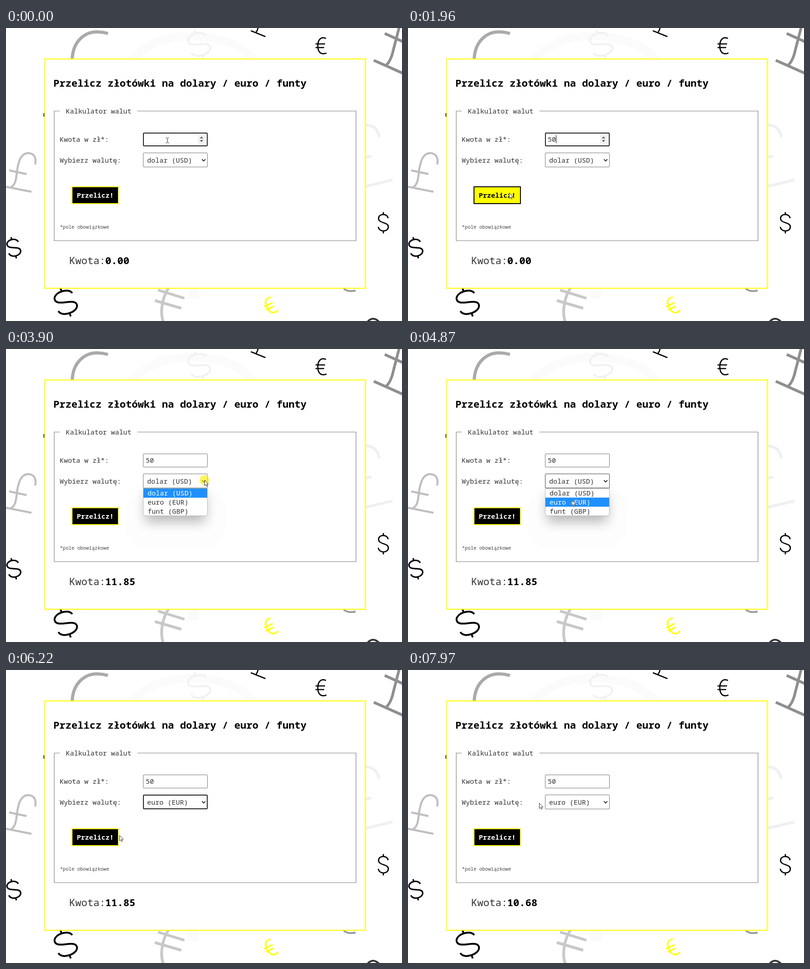
An HTML page for the animation above (8 s loop, 870 by 644 pixels).

```html
<!DOCTYPE html>
<html lang="pl">
<head>
<meta charset="utf-8">
<title>Kalkulator walut</title>
<style>
  html, body { margin: 0; width: 100%; height: 100%; overflow: hidden; background: #fff; }
  svg { display: block; width: 870px; height: 644px; }
  text { font: 300 15px "Noto Sans Mono", "DejaVu Sans Mono", monospace; fill: #333; white-space: pre; }
  .big { font-size: 22.08px; }
  .bold { font-weight: 700; fill: #000; }
  .semi { font-weight: 600; }
  .small { font-size: 10.6px; fill: #444; }
  .backdrop path { fill: none; vector-effect: non-scaling-stroke; }
</style>
</head>
<body>
<svg viewBox="0 0 870 644">
  <defs>
    <path id="dollar" vector-effect="non-scaling-stroke" d="M10.500-10C9-21-10.500-21-10.500-9.500C-10.500 2 11-2 11 9C11 21-10 21-11 9M0-23.500V-17M0 17V23.500"/>
    <path id="euro" vector-effect="non-scaling-stroke" d="M11-16C0-21-7-13-7 0C-7 14 0 21 12 16M-12-4H9M-12 4H7"/>
    <filter id="blur" x="-60%" y="-80%" width="220%" height="300%"><feGaussianBlur stdDeviation="13"/></filter>
  </defs>
  <rect width="870" height="644" fill="#fff"/>

  <g class="backdrop" fill="none" stroke="#000" stroke-width="2.700">
    <path stroke="#aaa" stroke-width="7" d="M145.500 68C147 30 172 8.500 200 8.500Q212 8.500 224 12"/>
    <path stroke="#fbfbfb" stroke-width="18" d="M274 70Q325 18 405 18Q500 18 545 70"/>
    <use href="#dollar" stroke="#f1f1f1" stroke-width="4" transform="translate(424 36) rotate(-18) scale(1.950 1.380)"/>
    <path d="M538 6L570 19M554-2Q553 5 549 10"/>
    <use href="#euro" transform="translate(692 39)"/>
    <path stroke="#8f8f8f" stroke-width="6" d="M808 71L872 99.500M864-2L851 48Q846 72 835 82M832 12L872 30"/>
    <path stroke="#f0f0f0" stroke-width="6" d="M790 213Q816 214 820 240M790 284L803 281M790 348L849 334"/>
    <path stroke="#bfbfbf" stroke-width="4.500" d="M64 300C68 283 59 274 47 275C31 277 27 296 24 315C22 336 20 346 9 351M0 349L56 360M7 313L45 321"/>
    <use href="#dollar" stroke-width="3.200" transform="translate(17 483) rotate(-14) scale(1.200 1.020)"/>
    <use href="#dollar" transform="translate(829 428)"/>
    <use href="#dollar" stroke-width="4" transform="translate(131 603) rotate(-20) scale(1.950 1.400)"/>
    <path stroke="#c8c8c8" stroke-width="6" d="M358 570C344 590 337 624 346 648M334 576L392 594M327 599L385 616"/>
    <path stroke="#fafafa" stroke-width="24" d="M412 573V595"/>
    <use href="#euro" stroke="#ff0" stroke-width="3.200" transform="translate(580 611) rotate(-27)"/>
    <path stroke="#999" stroke-width="4" d="M742 573Q752 581 768 577"/>
    <path stroke="#333" stroke-width="4" d="M793 647Q806 631 821 647"/>
    <path stroke-width="3" d="M84 187V195"/>
  </g>

  <rect x="85" y="68" width="705" height="504" fill="#fff" stroke="#ff0" stroke-width="2"/>
  <text class="big bold" x="104" y="129">Przelicz złotówki na dolary / euro / funty</text>
  <path d="M118 182.500H106V467.500H769V182.500H288.500" fill="none" stroke="#808080" stroke-width="1.200"/>
  <text x="131.500" y="188">Kalkulator walut</text>
  <text x="118" y="249.500">Kwota w zł*:</text>
  <text x="118" y="295.500">Wybierz walutę:</text>
  <text class="small" x="118.500" y="441">*pole obowiązkowe</text>
  <text class="big" x="139" y="519">Kwota:</text>
  <text class="big bold" x="218" y="519" id="result"></text>

  <rect id="inputBox" rx="1.500" fill="#fff"/>
  <text x="307" y="249.500" id="amount"></text>
  <path id="caret" d="M0 235.500V253" stroke="#000"/>
  <g id="spinner">
    <rect x="422" y="236" width="15" height="18" fill="#efefef"/>
    <path d="M426 242.500L429.500 238.500L433 242.500ZM426 246.500L429.500 250.500L433 246.500Z" fill="#505050"/>
  </g>

  <rect id="selectBox" rx="1.500" fill="#fff"/>
  <text x="310" y="295.500" id="choice"></text>
  <path d="M430.500 288.500L434.200 292.300L438 288.500" fill="none" stroke="#000" stroke-width="1.600"/>

  <rect id="button" x="145" y="349" width="102" height="37" stroke-width="2"/>
  <text class="semi" x="155.500" y="373" id="buttonText">Przelicz!</text>

  <g id="menu">
    <rect x="264" y="307" width="218" height="129" rx="45" fill="#fdfdfd"/>
    <rect x="306" y="320" width="132" height="60" fill="#000" opacity=".27" filter="url(#blur)"/>
    <path d="M301.500 306.500H442.500V361Q442.500 366.500 437 366.500H307Q301.500 366.500 301.500 361Z" fill="#fff" stroke="#bbb"/>
    <rect id="highlight" x="302" width="140" height="20" fill="#1e90ff"/>
  </g>

  <circle id="press" r="10.800" fill="#ffeb00" opacity=".62"/>
  <path id="beam" d="M351 241.500H353.500L354.500 242.500L355.500 241.500H358M354.500 242.500V251.500M351 252.500H353.500L354.500 251.500L355.500 252.500H358" fill="none" stroke="#222"/>
  <path id="arrow" d="M.5 .5V12.500L3.300 10L5.200 14L7 13.200L5.200 9.200H8.700Z" fill="#fff" stroke="#333"/>
</svg>
<script>
const LOOP = 8000, STEP = 70;
const el = id => document.getElementById(id);
const during = (t, from, to) => t >= from && t < to;
const set = (id, attrs) => {
  for (const key in attrs) el(id).setAttribute(key, attrs[key]);
};
const show = (id, on) => set(id, { visibility: on ? 'visible' : 'hidden' });

const options = ['dolar (USD)', 'euro (EUR)', 'funt (GBP)'];
const optionTexts = options.map((label, i) => {
  const text = document.createElementNS('http://www.w3.org/2000/svg', 'text');
  text.setAttribute('x', 311);
  text.setAttribute('y', 322 + i * 19.8);
  text.textContent = label;
  el('menu').append(text);
  return text;
});

// Each pointer move is a polyline of [time, x, y]
const moves = [
  [[1210, 354, 247], [1420, 237, 311], [1630, 214, 345], [1960, 222, 362]],
  [[3020, 222, 362], [3090, 258, 338], [3360, 345, 304], [3700, 436, 288]],
  [[4380, 436, 288], [4590, 398, 312], [4870, 360, 332], [5010, 357, 341]],
  [[5870, 357, 341], [6220, 249, 363], [6430, 224, 360]],
  [[7820, 224, 360], [7890, 250, 363], [7970, 288, 292]]
];

// The pointer is sampled in steps while it moves and rests in between
function pointerAt(t) {
  const move = moves.filter(m => t >= m[0][0]).pop() || moves[0];
  const start = move[0][0], last = move[move.length - 1];
  if (t >= last[0]) return [last[1], last[2]];
  const time = start + Math.max(0, Math.floor((t - start) / STEP)) * STEP;
  const i = move.findIndex(p => p[0] > time);
  const a = move[i - 1], b = move[i];
  const k = (time - a[0]) / (b[0] - a[0]);
  return [a[1] + (b[1] - a[1]) * k, a[2] + (b[2] - a[2]) * k];
}

const inside = ([x, y], left, top, right, bottom) =>
  x >= left && x <= right && y >= top && y <= bottom;

// The border is drawn inside the field's outer edge
function drawField(id, top, height, focused, color) {
  const line = focused ? 1.7 : 1;
  set(id, {
    x: 301 + line / 2, y: top + line / 2, width: 142 - line, height: height - line,
    stroke: focused ? '#000' : color, 'stroke-width': line
  });
}

function render(t) {
  const pointer = pointerAt(t);
  const seen = pointerAt(t - STEP); // hover styles trail the pointer by one step
  const place = { transform: `translate(${pointer})` };

  el('amount').textContent = t < 70 ? '' : t < 550 ? '5' : '50';
  el('result').textContent = t < 2160 ? '0.00' : t < 6960 ? '11.85' : '10.68';
  el('choice').textContent = options[t < 5540 ? 0 : 1];

  const typing = t < 2090;
  drawField('inputBox', 230, 30, typing, '#767676');
  show('spinner', typing);
  show('caret', during(t, 70, 1080) || during(t, 1610, 2090));
  set('caret', { transform: `translate(${t < 550 ? 316.5 : 325.5})` });

  const open = during(t, 3900, 5540);
  const selectHover = inside(seen, 301, 274, 443, 306);
  const dark = during(t, 4100, 5540) || (selectHover && !open);
  drawField('selectBox', 274, 32, during(t, 5540, 6690), dark ? '#444' : '#767676');

  show('menu', open);
  const active = pointer[1] > 326 ? 1 : 0;
  show('highlight', open);
  set('highlight', { y: 306.8 + active * 19.8 });
  optionTexts.forEach((text, i) => { text.style.fill = i === active ? '#fff' : '#333'; });

  const hover = inside(seen, 144, 348, 248, 387);
  set('button', { fill: hover ? '#ff0' : '#000', stroke: hover ? '#000' : '#ff0' });
  el('buttonText').style.fill = hover ? '#000' : '#fff';

  show('press', during(t, 2090, 2160) || during(t, 3900, 4100) ||
    during(t, 5340, 5540) || during(t, 6690, 6960));
  set('press', place);
  show('beam', t < 1280);
  show('arrow', t >= 1280);
  set('arrow', place);
}

const began = performance.now();
function frame() {
  render((performance.now() - began) % LOOP);
  requestAnimationFrame(frame);
}
frame();
</script>
</body>
</html>
```
